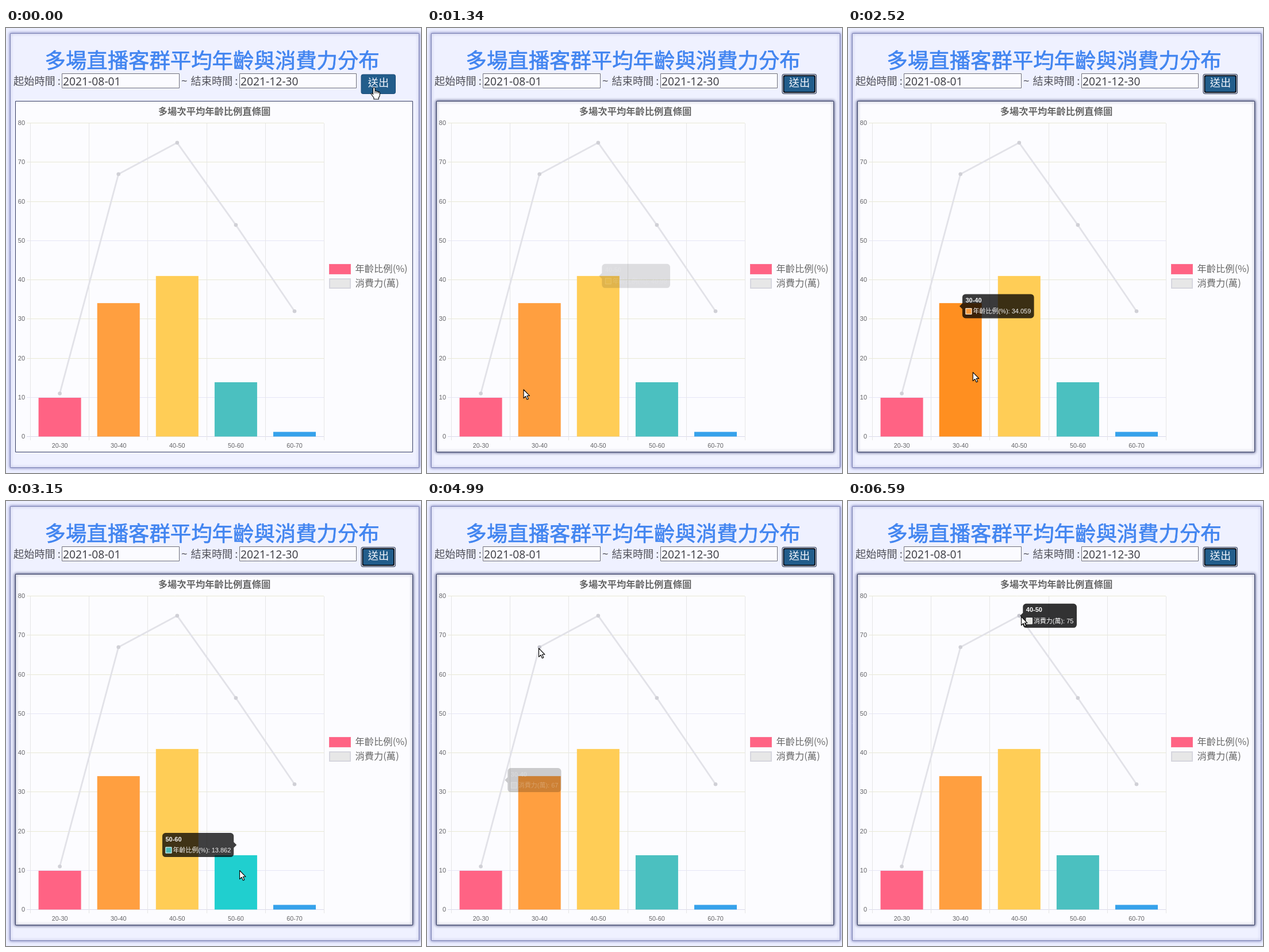
Recreate the animation shown at these times as an HTML page with a canvas. Size 722 px wide and 775 px high, loop 6630 ms.

```html
<!DOCTYPE html>
<html lang="zh-Hant">
<head>
<meta charset="utf-8">
<title>Chart</title>
<style>
html, body { margin: 0; width: 722px; height: 775px; overflow: hidden; background: #eceeff; }
canvas { display: block; }
</style>
</head>
<body>
<canvas id="stage" width="722" height="775"></canvas>
<script>
const ctx = document.getElementById('stage').getContext('2d');
const LOOP = 6630, FADE = 400;
const CJK = '"Noto Sans CJK TC", "Noto Sans CJK", sans-serif';
const LATIN = '"Noto Sans", "Noto Sans CJK TC", sans-serif';
const SMALL = '"Liberation Sans", "Noto Sans CJK TC", "Noto Sans CJK", sans-serif';

const ages = ['20-30', '30-40', '40-50', '50-60', '60-70'];
const share = [9.897, 34.059, 40.99, 13.862, 1.188];
const spend = [11, 67, 75, 54, 32];
const fills = ['#ff6384', '#ff9f40', '#ffcd56', '#4bc0c0', '#36a2eb'];
const hovers = ['#ff3d66', '#ff8f20', '#ffbf34', '#20cfcf', '#1594e8'];
const colX = i => 93.6 + i * 102.1;
const valY = v => 711.5 - v * 6.822;

// pointer tip: time, x, y
const path = [
  [0, 640, 103], [320, 640, 103], [620, 560, 240], [900, 400, 430], [1050, 325, 500],
  [1220, 262, 570], [1340, 168, 629], [1550, 128, 655], [1700, 106, 664], [2000, 106, 664],
  [2300, 160, 620], [2500, 210, 600], [2720, 290, 600], [2920, 340, 622], [3150, 406, 643],
  [3260, 406, 643], [3360, 362, 630], [3480, 300, 605], [3620, 215, 590], [3850, 158, 600],
  [3960, 94, 634], [4250, 94, 634], [4500, 120, 520], [4800, 172, 340], [4960, 194, 256],
  [5500, 194, 256], [5750, 215, 275], [6130, 238, 262], [6270, 301, 201], [LOOP, 301, 201]
];

// hovered item over time: b = bar, p = point, empty = nothing
const hoverLog = [
  [1060, 'b2'], [1240, ''], [1350, 'b1'], [1500, ''], [1560, 'b0'], [2160, ''], [2290, 'b1'],
  [2560, ''], [2630, 'b2'], [2920, ''], [2974, 'b3'], [3355, ''], [3420, 'b2'], [3555, ''],
  [3590, 'b1'], [3850, ''], [3954, 'p0'], [4300, ''], [4944, 'p1'], [5560, ''], [6220, 'p2']
];

const lerp = (a, b, k) => a + (b - a) * k;
const outQuart = k => 1 - Math.pow(1 - Math.min(1, Math.max(0, k)), 4);

function text(str, x, y, size, family, color, align = 'left', weight = 400) {
  ctx.font = `${weight} ${size}px ${family}`;
  ctx.fillStyle = color;
  ctx.textAlign = align;
  ctx.fillText(str, x, y);
}

function rect(x, y, w, h, fill, stroke, line = 1) {
  ctx.fillStyle = fill;
  ctx.fillRect(x, y, w, h);
  if (!stroke) return;
  ctx.strokeStyle = stroke;
  ctx.lineWidth = line;
  ctx.strokeRect(x + line / 2, y + line / 2, w - line, h - line);
}

function round(x, y, w, h, r, fill) {
  ctx.fillStyle = fill;
  ctx.beginPath();
  ctx.roundRect(x, y, w, h, r);
  ctx.fill();
}

function poly(points) {
  ctx.beginPath();
  points.forEach(p => ctx.lineTo(p[0], p[1]));
}

function line(x1, y1, x2, y2, color) {
  ctx.strokeStyle = color;
  ctx.lineWidth = 1;
  poly([[x1, y1], [x2, y2]]);
  ctx.stroke();
}

function glow(color, blur, draw) {
  ctx.save();
  ctx.shadowColor = color;
  ctx.shadowBlur = blur;
  draw();
  ctx.restore();
}

// velocity at a key; zero next to a pause
function slope(i, c) {
  const a = path[i - 1], b = path[i], d = path[i + 1];
  if (!a || !d) return 0;
  const still = (p, q) => p[1] === q[1] && p[2] === q[2];
  return still(a, b) || still(b, d) ? 0 : (d[c] - a[c]) / (d[0] - a[0]);
}

function pointerAt(t) {
  let i = 0;
  while (i < path.length - 2 && t >= path[i + 1][0]) i++;
  const a = path[i], b = path[i + 1], span = b[0] - a[0], k = (t - a[0]) / span;
  const k2 = k * k, k3 = k2 * k;
  return [1, 2].map(c =>
    (2 * k3 - 3 * k2 + 1) * a[c] + (k3 - 2 * k2 + k) * span * slope(i, c) +
    (3 * k2 - 2 * k3) * b[c] + (k3 - k2) * span * slope(i + 1, c));
}

function tipTarget(item) {
  const i = +item[1], bar = item[0] === 'b';
  const label = bar ? '年齡比例(%): ' + share[i] : '消費力(萬): ' + spend[i];
  ctx.font = `11px ${SMALL}`;
  const w = ctx.measureText(label).width + 24;
  const px = colX(i), y = valY(bar ? share[i] : spend[i]) - 21, left = px < 300;
  return { item, label, left, w, y, x: left ? px + 6.5 : px - 6.5 - w, o: 1 };
}

function tipAt(t) {
  let from = null, to = null, start = 0;
  const now = time => {
    if (!to) return null;
    const k = outQuart((time - start) / FADE), s = { ...to };
    for (const key of ['x', 'y', 'w', 'o']) s[key] = lerp(from[key], to[key], k);
    return s;
  };
  for (const [time, item] of hoverLog) {
    if (time > t) break;
    const s = now(time);
    to = item ? tipTarget(item) : { ...s, o: 0 };
    from = s || { ...to, o: 0 };
    start = time;
  }
  return now(t);
}

function drawPage(focused, over) {
  rect(0, 0, 722, 775, '#eceeff');
  glow('#7c82bc', 5, () => rect(7, 9, 712, 757, '#eff1ff', '#7b80b4'));
  const title = '多場直播客群平均年齡與消費力分布';
  text(title, 67.5, 70, 36.4, CJK, '#4285f0');
  ctx.strokeStyle = '#4285f0';
  ctx.lineWidth = 0.7;
  ctx.strokeText(title, 67.5, 70);
  text('起始時間 :', 13, 99, 18.2, CJK, '#505058');
  text('~', 305, 99, 18.2, LATIN, '#505058');
  text('結束時間 :', 321.5, 99, 18.2, CJK, '#505058');
  rect(97, 79, 205, 26, '#fbfbff', '#70707a');
  rect(406, 79, 204, 26, '#fbfbff', '#70707a');
  text('2021-08-01', 99, 100, 19.3, LATIN, '#45454b');
  text('2021-12-30', 408, 100, 19.3, LATIN, '#45454b');
  if (focused) {
    round(617.5, 80, 60.5, 35, 4, '#1c2740');
    round(618.5, 81, 58.5, 33, 3, '#eef2ff');
    round(619.5, 82, 56.5, 31, 3, '#0c1420');
    round(621.5, 84, 52.5, 27, 2, '#225d8b');
  } else {
    round(617.5, 80.5, 60.5, 34.5, 4, '#1c4c78');
    round(618.5, 81.5, 58.5, 32.5, 3, '#225d8b');
  }
  text('送出', 648, 102, 18.2, CJK, '#f4f7ff', 'center');
  const panel = () => rect(16, 127, 692, 612, '#fcfcff', '#343c62');
  if (over) glow('#3c4270', 5, panel); else panel();
}

function drawChart(hot) {
  text('多場次平均年齡比例直條圖', 362.5, 151.3, 16.3, CJK, '#666', 'center', 700);
  for (let k = 0; k <= 8; k++) {
    const y = Math.floor(valY(k * 10)) + 0.5;
    line(36, y, 553, y, k === 0 ? '#d9d9ea' : k === 1 || k === 5 ? '#e5e5f6' : '#e8e8d4');
    text(String(k * 10), 33, y + 3.5, 11, SMALL, '#626266', 'right');
  }
  for (let k = 0; k <= 5; k++) {
    const x = Math.round(42 + k * 102.2) + 0.5;
    line(x, 166, x, 718, '#e6e6e6');
  }
  ages.forEach((age, i) => {
    const top = valY(share[i]);
    rect(colX(i) - 37, top, 74, 711.5 - top, hot === 'b' + i ? hovers[i] : fills[i]);
    text(age, colX(i), 731, 10.8, SMALL, '#626266', 'center');
  });
  ctx.strokeStyle = '#e2e2e8';
  ctx.lineWidth = 2.8;
  ctx.lineJoin = 'round';
  poly(spend.map((v, i) => [colX(i), valY(v)]));
  ctx.stroke();
  spend.forEach((v, i) => {
    ctx.fillStyle = hot === 'p' + i ? '#c4c4cc' : '#d0d0d6';
    ctx.beginPath();
    ctx.arc(colX(i), valY(v), 3.3, 0, Math.PI * 2);
    ctx.fill();
  });
  rect(562, 411, 38, 18, '#ff6384', '#fa7896');
  rect(562, 436, 38, 18, '#e7e7e7', '#d6d6de', 2);
  text('年齡比例(%)', 607.5, 424.5, 16.3, CJK, '#666');
  text('消費力(萬)', 607.5, 450, 16.3, CJK, '#666');
}

function drawTip(s) {
  if (!s || s.o < 0.01) return;
  const { x, y, w } = s, mid = y + 21, alpha = Math.pow(s.o, 1.5);
  ctx.save();
  ctx.globalAlpha = 0.8 * alpha;
  ctx.fillStyle = '#000';
  ctx.beginPath();
  ctx.roundRect(x, y, w, 42, 5.5);
  // caret winds the same way as the box
  if (s.left) {
    ctx.moveTo(x, mid + 5); ctx.lineTo(x - 5, mid); ctx.lineTo(x, mid - 5);
  } else {
    ctx.moveTo(x + w, mid - 5); ctx.lineTo(x + w + 5, mid); ctx.lineTo(x + w, mid + 5);
  }
  ctx.closePath();
  ctx.fill();
  ctx.globalAlpha = alpha;
  const i = +s.item[1];
  text(ages[i], x + 5.5, y + 14.5, 11, SMALL, '#fff', 'left', 700);
  rect(x + 5.5, y + 24.5, 11, 11, s.item[0] === 'b' ? fills[i] : '#e4e4e0', '#fff');
  text(s.label, x + 18.5, y + 33.7, 11, SMALL, '#fff');
  ctx.restore();
}

function drawPointer(x, y, hand) {
  ctx.save();
  ctx.translate(x, y);
  ctx.fillStyle = '#fff';
  ctx.strokeStyle = '#000';
  ctx.lineWidth = 1.1;
  ctx.lineJoin = 'round';
  if (hand) {
    ctx.beginPath();
    ctx.moveTo(-1.5, 13);
    ctx.lineTo(-1.5, 2);
    ctx.quadraticCurveTo(0, -1, 2, 2);
    ctx.lineTo(2, 7);
    ctx.quadraticCurveTo(4, 5.5, 5.2, 7.6);
    ctx.quadraticCurveTo(7, 6.5, 8, 8.6);
    ctx.quadraticCurveTo(10, 7.8, 10.3, 10);
    ctx.lineTo(10.3, 14);
    ctx.quadraticCurveTo(10, 17, 8.3, 18);
    ctx.lineTo(8.3, 21);
    ctx.lineTo(0, 21);
    ctx.lineTo(0, 18.5);
    ctx.lineTo(-4.8, 12);
    ctx.quadraticCurveTo(-5, 9, -1.5, 12);
    ctx.fill();
    ctx.stroke();
    for (const fx of [2, 5.2, 8]) line(fx, 7.5, fx, 11, '#000');
  } else {
    poly([[0.5, 0.5], [0.5, 15.5], [4, 12.2], [6.4, 17.7], [8.8, 16.7], [6.4, 11.3], [11, 11.3]]);
    ctx.closePath();
    ctx.fill();
    ctx.stroke();
  }
  ctx.restore();
}

function draw(t) {
  const [x, y] = pointerAt(t);
  const onButton = x > 618 && x < 678 && y > 80 && y < 115;
  const hot = hoverLog.reduce((item, e) => e[0] <= t ? e[1] : item, '');
  drawPage(t >= 240, t > 320 && y > 127);
  drawChart(hot);
  drawTip(tipAt(t));
  drawPointer(x, y, onButton);
}

const begin = performance.now();
function tick() {
  draw((performance.now() - begin) % LOOP);
  requestAnimationFrame(tick);
}
tick();
</script>
</body>
</html>
```
